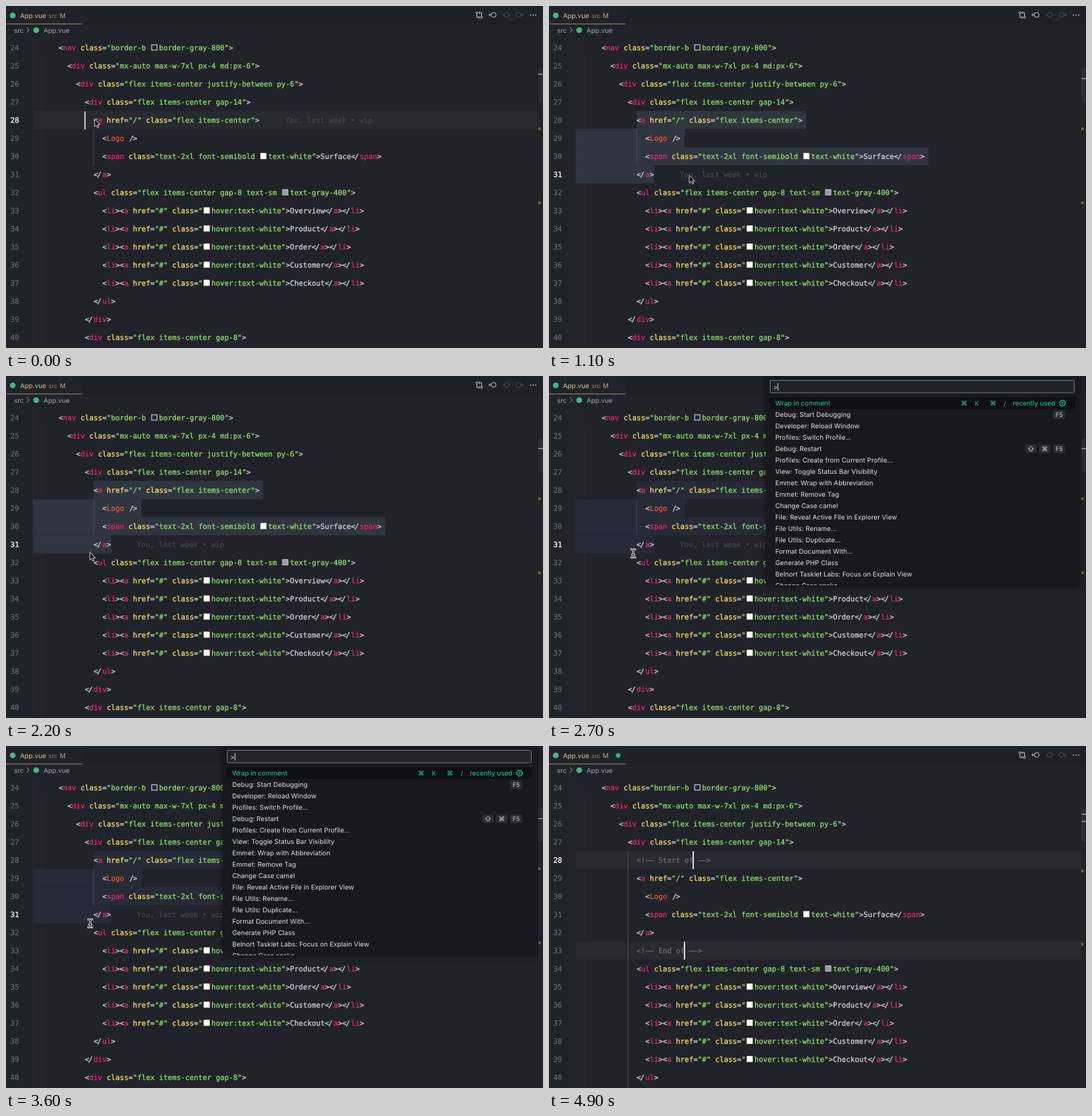
Write an HTML page that moves like this. It is 800 by 510 pixels and loops after 5 s.

```html
<!DOCTYPE html>
<html lang="en">
<head>
<meta charset="utf-8">
<title>Wrap in comment</title>
<style>
  html, body { margin: 0; width: 100%; height: 100%; overflow: hidden; background: #20232a; }
  svg { display: block; width: 800px; height: 510px; }
  text { font: 9.85px Inter, "Open Sans", sans-serif; text-rendering: geometricPrecision; white-space: pre; }
  .code text {
    font: 10.8px "DejaVu Sans Mono", "Noto Sans Mono", monospace;
    fill: currentColor; stroke: currentColor; stroke-width: .25;
  }
  .key { font: 9.5px "DejaVu Sans", sans-serif; text-anchor: middle; }
  .f { font-size: 9px; text-anchor: middle; }
  .sm { font-size: 8.8px; }
  .num { color: #646973; text-anchor: end; }
  .now { color: #f2f2f4; text-anchor: end; }
  .p { color: #d8d3dc; }
  .tag { color: #f0256c; }
  .comp { color: #ee5239; }
  .attr { color: #ffe566; }
  .str { color: #93e06f; }
  .note { color: #6a6e77; }
  .blame { color: #464a53; }

  .anim, #sel rect { animation: 5s step-end infinite; }
  #before { animation-name: before; }
  #after { animation-name: after; }
  .idle { animation-name: idle; }
  #done { animation-name: done; }
  #palette, #beam { animation-name: palette; }
  #arrow { animation-name: move; }
  #sel { animation-name: dim; }
  #sel #s28 { animation-name: s28; }
  #sel #s29 { animation-name: s29; }
  #sel #s30 { animation-name: s30; }
  #sel #s31 { animation-name: s31; }

  @keyframes before { 0% { visibility: visible } 90%, 100% { visibility: hidden } }
  @keyframes after { 0% { visibility: hidden } 90%, 100% { visibility: visible } }
  @keyframes idle { 0% { opacity: 1 } 8%, 100% { opacity: 0 } }
  @keyframes done { 0% { opacity: 0 } 16%, 100% { opacity: 1 } }
  @keyframes palette { 0% { visibility: hidden } 52% { visibility: visible } 90%, 100% { visibility: hidden } }
  @keyframes dim { 0% { fill: #303640 } 52%, 100% { fill: #272b37 } }
  @keyframes s28 { 0% { width: 0 } 8% { width: 14.5px } 10%, 100% { width: 252.5px } }
  @keyframes s29 { 0% { width: 0 } 10% { width: 118px } 12%, 100% { width: 162px } }
  @keyframes s30 { 0% { width: 0 } 12% { width: 130px } 14% { width: 143px } 16%, 100% { width: 525px } }
  @keyframes s31 { 0% { width: 0 } 16%, 100% { width: 116.5px } }
  @keyframes move {
    0% { transform: translate(132px, 168.5px); visibility: visible; }
    6% { transform: translate(132px, 168.5px); animation-timing-function: steps(6); }
    18% { transform: translate(209px, 252.5px); }
    24% { transform: translate(209px, 252.5px); animation-timing-function: steps(3); }
    30% { transform: translate(125px, 263px); visibility: visible; }
    52%, 100% { transform: translate(125px, 263px); visibility: hidden; }
  }
</style>
</head>
<body>
<svg viewBox="0 0 800 510">
  <rect width="800" height="510" fill="#20232a"/>

  <!-- tab bar -->
  <rect x="114" width="686" height="27" fill="#1e2127"/>
  <rect y="26.3" width="114" height="1" fill="#a8926c"/>
  <circle cx="10" cy="14" r="4.3" fill="#41b883"/>
  <text x="21" y="17.5" fill="#e2c08d">App.vue</text>
  <text x="63.5" y="17.5" class="sm" fill="#94866d">src</text>
  <text x="80" y="17.5" fill="#c4a87d">M</text>
  <text x="12" y="39.5" fill="#a3a7ae">src</text>
  <path d="M31 32l3.6 3.8-3.6 3.8" fill="none" stroke="#a3a7ae"/>
  <circle cx="45" cy="36" r="4.3" fill="#41b883"/>
  <text x="56" y="39.5" fill="#a3a7ae">App.vue</text>
  <g fill="none" stroke="#c3c6cb">
    <circle cx="701.5" cy="10" r="1.5"/>
    <circle cx="708.5" cy="17" r="1.5"/>
    <path d="M701.5 11.5v5.5h4M704 15.2l1.8 1.8-1.8 1.8M708.5 15.5V10h-4M706 8.2L704.2 10l1.8 1.8"/>
    <circle cx="726.5" cy="13.2" r="3.6"/>
    <path d="M722.8 13.2h-3.4M721.5 11l-2.2 2.2 2.2 2.2"/>
    <g stroke="#4d5159">
      <circle cx="745.8" cy="13.2" r="3.6"/>
      <path d="M742 13.2h-2M749.5 13.2h2"/>
      <circle cx="763.5" cy="13.2" r="3.6"/>
      <path d="M767.2 13.2h3.4M768.5 11l2.2 2.2-2.2 2.2"/>
    </g>
  </g>
  <g fill="#c3c6cb"><circle cx="781.3" cy="13.5" r=".9"/><circle cx="785.3" cy="13.5" r=".9"/><circle cx="789.3" cy="13.5" r=".9"/></g>

  <!-- editor -->
  <path d="M40 48V510M52.5 75V510" stroke="#25282f"/>
  <rect x="793" y="93" width="7" height="50" fill="#2a2d34"/>
  <g id="before" class="code anim">
    <rect class="idle anim" x="40" y="156.5" width="753" height="27" fill="#272a31"/>
    <g id="sel" class="anim">
      <rect id="s28" x="130.5" y="156.5" height="27"/>
      <rect id="s29" x="40" y="183.5" height="27"/>
      <rect id="s30" x="40" y="210.5" height="27"/>
      <rect id="s31" x="40" y="237.5" height="27"/>
    </g>
    <path d="M130.8 184V238" stroke="#464a53"/>
    <path d="M793 183h3.5M793 293.5h3.5" stroke="#716d35" stroke-width="4"/>
    <g id="code1"></g>
    <g class="idle anim">
      <rect x="793" y="101" width="7" height="1.5" fill="#999ca2"/>
      <text class="now" x="19.5" y="173.7">28</text>
      <text class="blame" x="416" y="173.7">You, last week • wip</text>
      <rect x="116.8" y="157" width="1.6" height="27" fill="#f4f4f4"/>
    </g>
    <g id="done" class="anim">
      <rect x="793" y="107.5" width="7" height="1.5" fill="#999ca2"/>
      <text class="now" x="19.5" y="254.7">31</text>
      <text class="blame" x="195" y="254.7">You, last week • wip</text>
    </g>
  </g>
  <g id="after" class="code anim">
    <circle cx="103" cy="14" r="3.5" fill="#1db992"/>
    <path d="M40 170H793M40 305H793" stroke="#272a31" stroke-width="27"/>
    <path d="M117.8 157V510" stroke="#4a4e57"/>
    <path d="M793 186.5h3.5M793 295.5h3.5" stroke="#716d35" stroke-width="4"/>
    <path d="M793 101.7h7M793 112.5h7" stroke="#999ca2" stroke-width="1.5"/>
    <g id="code2"></g>
    <text class="now" x="19.5" y="173.7">28</text>
    <path d="M214.8 157v26.5M201.8 292v26.5" stroke="#f4f4f4" stroke-width="1.8"/>
  </g>

  <!-- command palette -->
  <g id="palette" class="anim">
    <rect x="323" y="-8" width="467" height="321" rx="4" fill="#17191e" style="filter: drop-shadow(0 1px 4px rgba(0,0,0,.55))"/>
    <rect x="329.5" y="6.5" width="453" height="18.5" rx="1.5" fill="#20232a" stroke="#777b83"/>
    <text x="334" y="19.7" fill="#d5d7db">&gt;</text>
    <rect x="340.6" y="10.5" width="1" height="11" fill="#e8e8e8"/>
    <rect x="328" y="32" width="456" height="17" rx="2" fill="#0e1013"/>
    <clipPath id="clip"><rect x="323" y="30" width="467" height="282"/></clipPath>
    <g id="rows" clip-path="url(#clip)" fill="#dfe1e4"></g>
    <g fill="#1fd3a4">
      <text class="key" x="618.5" y="44">⌘</text>
      <text class="f" x="637.5" y="44">K</text>
      <text class="key" x="661.5" y="44">⌘</text>
      <text class="f" x="679" y="44">/</text>
      <text x="691" y="44">recently used</text>
      <g fill="none" stroke="#1fd3a4">
        <circle cx="765" cy="40.5" r="3.9"/>
        <circle cx="765" cy="40.5" r="1.5"/>
        <circle cx="765" cy="40.5" r="4.8" stroke-dasharray="1.9 1.87"/>
      </g>
    </g>
    <g fill="#2a2d34">
      <rect x="751" y="51" width="18" height="13" rx="2.5"/>
      <rect x="751" y="102" width="18" height="13" rx="2.5"/>
      <rect x="730" y="102" width="17" height="13" rx="2.5"/>
      <rect x="709.5" y="102" width="17" height="13" rx="2.5"/>
    </g>
    <g fill="#cfd2d6">
      <text class="f" x="760" y="61">F5</text>
      <text class="f" x="760" y="112">F5</text>
      <text class="key" x="738.5" y="112">⌘</text>
    </g>
    <path d="M718 104.6l4 4h-2.2v3.2h-3.6v-3.2H714z" fill="none" stroke="#cfd2d6" stroke-width=".9" stroke-linejoin="round"/>
  </g>

  <!-- pointers -->
  <path id="arrow" class="anim" d="M0 0V11.4l2.6-2.4 1.7 4 2-.8-1.7-3.9h3.5z" fill="#08090b" stroke="#f5f5f5" stroke-width=".9"/>
  <g id="beam" class="anim" fill="none" stroke-linecap="square">
    <path stroke="#f5f5f5" stroke-width="2.8" d="M122.8 258.6q2.7 0 2.7 2v7.8q0 2-2.7 2M128.2 258.6q-2.7 0-2.7 2M128.2 270.4q-2.7 0-2.7-2M124 266.3h3"/>
    <path stroke="#0b0c0e" stroke-width="1" d="M122.8 258.6q2.7 0 2.7 2v7.8q0 2-2.7 2M128.2 258.6q-2.7 0-2.7 2M128.2 270.4q-2.7 0-2.7-2M124 266.3h3"/>
  </g>
</svg>
<script>
  const CELL = 6.5, LEFT = 39.5, ROW = 27;
  const pad = (n, s) => ' '.repeat(n) + s;
  const $ = id => document.getElementById(id);

  function add(parent, name, attrs, text = '') {
    const el = document.createElementNS('http://www.w3.org/2000/svg', name);
    for (const k in attrs) el.setAttribute(k, attrs[k]);
    el.textContent = text;
    parent.append(el);
  }

  // "@w", "@g" and "@b" are colour swatches two cells wide
  const swatches = { w: ['#fff', '#fff'], g: ['#9299a5', '#d4d6da'], b: ['#1f2630', '#eee'] };
  const item = s => pad(16, `<li><a href="#" class="@whover:text-white">${s}</a></li>`);
  const lines = [
    pad(6, '<nav class="border-b @bborder-gray-800">'),
    pad(8, '<div class="mx-auto max-w-7xl px-4 md:px-6">'),
    pad(10, '<div class="flex items-center justify-between py-6">'),
    pad(12, '<div class="flex items-center gap-14">'),
    pad(14, '<a href="/" class="flex items-center">'),
    pad(16, '<Logo />'),
    pad(16, '<span class="text-2xl font-semibold @wtext-white">Surface</span>'),
    pad(14, '</a>'),
    pad(14, '<ul class="flex items-center gap-8 text-sm @gtext-gray-400">'),
    ...['Overview', 'Product', 'Order', 'Customer', 'Checkout'].map(item),
    pad(14, '</ul>'),
    pad(12, '</div>'),
    pad(12, '<div class="flex items-center gap-8">')
  ];
  const wrapped = [
    ...lines.slice(0, 4), pad(14, '<!—— Start of ——>'),
    ...lines.slice(4, 8), pad(14, '<!—— End of ——>'),
    ...lines.slice(8, 15)
  ];

  const lexer = /<!.*>|"[^"]*"|(?<=<\/?)\w+|[\w-]+(?==")|\s+|<\/|\/>|[<>=]|\w+/g;

  function kind(tok, line, at) {
    if (tok.startsWith('<!')) return 'note';
    if (tok[0] === '"') return 'str';
    if (/<\/?$/.test(line.slice(0, at))) return /^[A-Z]/.test(tok) ? 'comp' : 'tag';
    return line[at + tok.length] === '=' ? 'attr' : 'p';
  }

  function drawLine(group, line, i) {
    const mid = 62 + i * ROW, y = mid + 3.7;
    const put = (s, x, cls) => add(group, 'text', { x, y, class: cls }, s);
    put(24 + i, 19.5, 'num');
    for (const { 0: tok, index } of line.matchAll(lexer)) {
      const x = LEFT + index * CELL;
      if (!tok.trim()) continue;
      // tight pairs, as in a font with ligatures
      if (tok === '</') { put('<', x, 'p'); put('/', x + 5.2, 'p'); continue; }
      if (tok === '/>') { put('/', x + 1.2, 'p'); put('>', x + CELL, 'p'); continue; }
      const cls = kind(tok, line, index);
      let at = x;
      for (const part of tok.split(/(@[wgb])/)) {
        if (part[0] === '@') {
          const [fill, stroke] = swatches[part[1]];
          add(group, 'rect', { x: at + 2, y: mid - 4.2, width: 8, height: 8, fill, stroke });
        } else if (part) put(part, at, cls);
        at += part.length * CELL;
      }
    }
  }

  lines.forEach((line, i) => drawLine($('code1'), line, i));
  wrapped.forEach((line, i) => drawLine($('code2'), line, i));

  [
    'Wrap in comment', 'Debug: Start Debugging', 'Developer: Reload Window',
    'Profiles: Switch Profile...', 'Debug: Restart',
    'Profiles: Create from Current Profile...', 'View: Toggle Status Bar Visibility',
    'Emmet: Wrap with Abbreviation', 'Emmet: Remove Tag', 'Change Case camel',
    'File: Reveal Active File in Explorer View', 'File Utils: Rename...',
    'File Utils: Duplicate...', 'Format Document With...', 'Generate PHP Class',
    'Belnort Tasklet Labs: Focus on Explain View', 'Change Case snake'
  ].forEach((s, i) => {
    add($('rows'), 'text', { x: 337, y: 44 + i * 17, fill: i ? 'inherit' : '#1fd3a4' }, s);
  });
</script>
</body>
</html>
```
